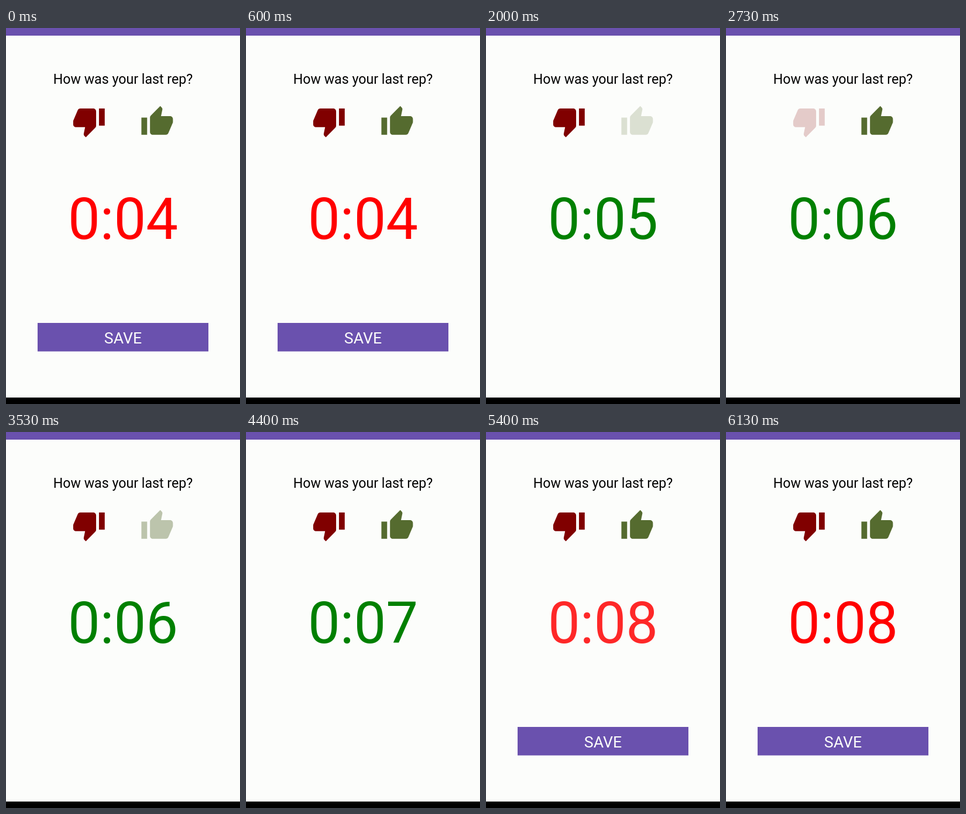
Animation of 400x640 px, one loop 6.47 s. Source, as an HTML page:

```html
<!DOCTYPE html>
<html lang="en">
<head>
<meta charset="utf-8">
<title>Rep timer</title>
<style>
  html, body { margin: 0; width: 100%; height: 100%; overflow: hidden; background: #fcfdfb; }
  svg { display: block; width: 400px; height: 640px; }
  text { font-family: Roboto, sans-serif; text-anchor: middle; }
</style>
</head>
<body>
<svg viewBox="0 0 400 640">
  <defs>
    <path id="thumb" d="M1 21h4V9H1v12zm22-11c0-1.1-.9-2-2-2h-6.31l.95-4.57.03-.32c0-.41-.17-.79-.44-1.06L14.17 1 7.59 7.59C7.22 7.95 7 8.45 7 9v10c0 1.1.9 2 2 2h9c.83 0 1.54-.5 1.84-1.22l3.02-7.05c.09-.23.14-.47.14-.73v-2z"/>
  </defs>
  <rect width="400" height="13" fill="#6a51ae"/>
  <rect y="629" width="400" height="11"/>
  <text x="200" y="95" font-size="23.2">How was your last rep?</text>
  <use id="down" href="#thumb" fill="#800000" transform="translate(171.2 188.4) scale(-2.45)"/>
  <use id="up" href="#thumb" fill="#556b2f" transform="translate(229 130.4) scale(2.45)"/>
  <text id="timer" x="200" y="359" font-size="97.5"></text>
  <g id="save">
    <rect x="54" y="502" width="292" height="48.5" fill="#6a51ae"/>
    <text x="200" y="537" font-size="26.7" fill="#fcfdfb">SAVE</text>
  </g>
</svg>
<script>
const LOOP = 6470, FADE = 250, DIM = 0.2;
const START = 850, STOP = 5230, FIRST_TICK = 1600;

// Each tap: [press time, release time]
const taps = {
  timer: [[800, START], [5070, STOP]],
  up: [[2000, 2070], [3400, 3445]],
  down: [[2730, 2870], [4070, 4130]]
};
const el = id => document.getElementById(id);
const timer = el('timer'), save = el('save');
const ease = u => u < 0.5 ? 2 * u * u : 1 - 2 * (1 - u) ** 2;

// A pressed control dims at once and eases back after release.
function opacity(list, t) {
  const tap = list.find(([press, release]) => t >= press && t < release + FADE);
  if (!tap) return 1;
  return DIM + (1 - DIM) * ease(Math.max(0, t - tap[1]) / FADE);
}

function draw(t) {
  const running = t >= START && t < STOP;
  const ticks = Math.floor((t - FIRST_TICK) / 1000) + 1;
  const seconds = 4 + Math.min(4, Math.max(0, ticks));
  timer.textContent = '0:0' + seconds;
  timer.setAttribute('fill', running ? '#008000' : '#ff0000');
  save.setAttribute('visibility', running ? 'hidden' : 'visible');
  for (const id in taps) el(id).setAttribute('opacity', opacity(taps[id], t));
}

const begin = performance.now();
function frame() {
  draw((performance.now() - begin) % LOOP);
  requestAnimationFrame(frame);
}
frame();
</script>
</body>
</html>
```
